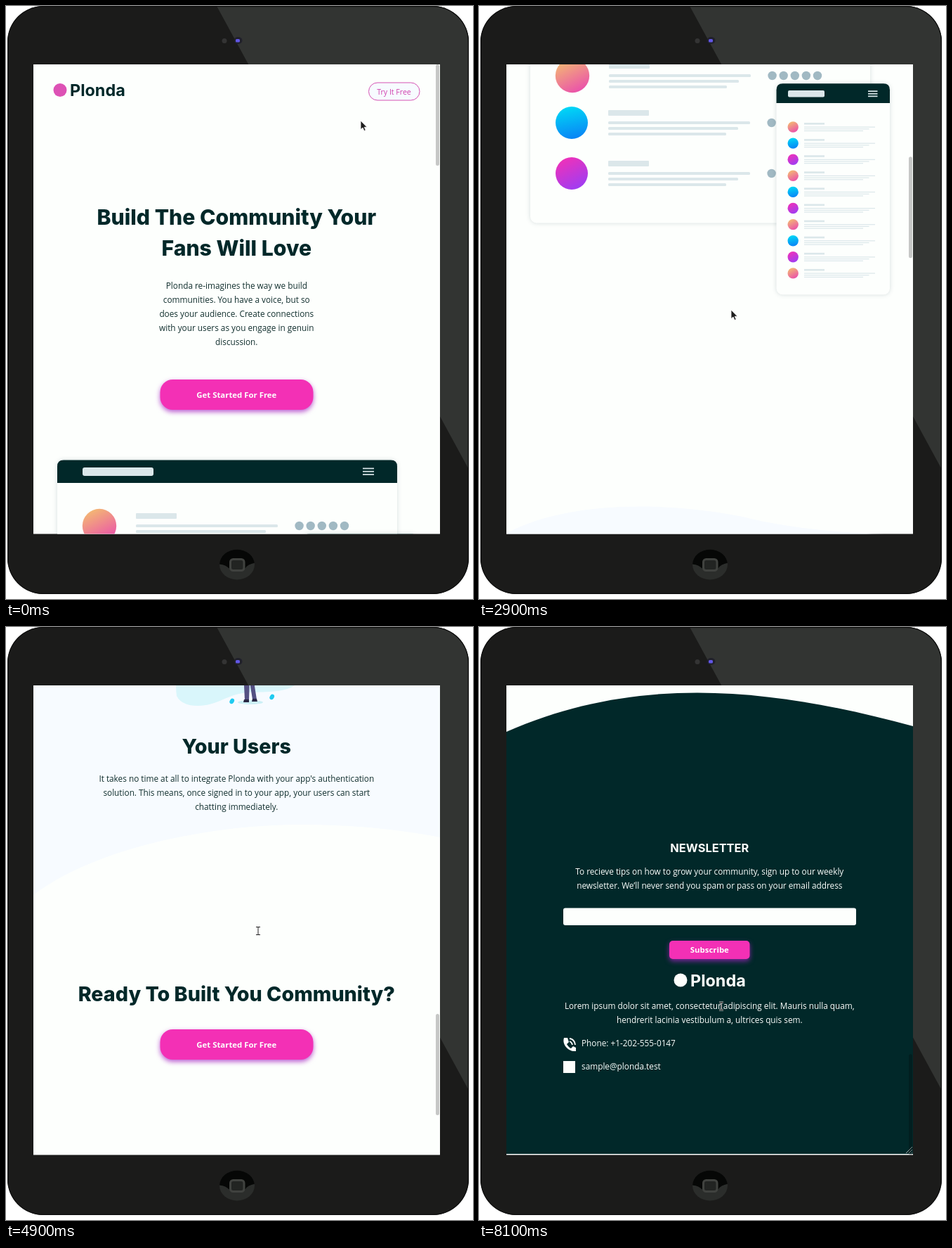
Animation of 665x843 px, one loop 8.9 s. Source, as an HTML page:

```html
<!DOCTYPE html>
<html lang="en">
<head>
<meta charset="utf-8">
<title>Tablet landing page</title>
<style>
  html, body { margin: 0; width: 100%; height: 100%; overflow: hidden; background: #fff; }
  svg { display: block; width: 665px; height: 843px; }
  text { font: 11.8px "Open Sans", sans-serif; fill: #12302f; }
  .mid { text-anchor: middle; }
  .h1, .h2, .h3, .brand { font-family: Inter, sans-serif; font-weight: 700; fill: #012829; }
  .h1 { font-size: 30.2px; font-weight: 800; }
  .h2 { font-size: 28.7px; font-weight: 800; }
  .h3 { font-size: 16.4px; }
  .brand { font-size: 23.4px; }
  .label { font-size: 11.4px; font-weight: 700; }
  .light text, .label { fill: #fdfffd; }
  .btn rect { filter: drop-shadow(0 3px 3.5px rgba(165, 35, 195, .75)); }
  .card { filter: drop-shadow(0 0 3px rgba(0, 40, 50, .16)); }
</style>
</head>
<body>
<svg viewBox="0 0 665 843">
  <defs>
    <clipPath id="screen"><rect x="39" y="83" width="579" height="667.4"/></clipPath>
    <clipPath id="body"><rect x="2" width="657" height="836" rx="51"/></clipPath>
    <clipPath id="home"><ellipse cx="329" cy="794" rx="25" ry="21.5"/></clipPath>
    <linearGradient id="sun" x1=".2" y1="0" x2=".7" y2="1"><stop stop-color="#f4bd70"/><stop offset="1" stop-color="#ea4fac"/></linearGradient>
    <linearGradient id="sea" x1=".4" y1="0" x2=".6" y2="1"><stop stop-color="#00d8f6"/><stop offset="1" stop-color="#0a83f5"/></linearGradient>
    <linearGradient id="plum" x1=".2" y1="0" x2=".7" y2="1"><stop stop-color="#f331b6"/><stop offset="1" stop-color="#9d3df4"/></linearGradient>
    <path id="leaf" d="M0 3Q-5 2 -5 -2Q-2 -2 -1 0Q-1 -3 0 -4Q2 -3 1 0Q3 -2 5 -2Q4 3 0 3Z" fill="#14c9f2"/>
  </defs>

  <!-- tablet -->
  <g clip-path="url(#body)">
    <rect width="665" height="843" fill="#1b1b1a"/>
    <path d="M300 0H665V670L657 655Z" fill="#323432"/>
    <rect x="2" width="657" height="836" rx="51" fill="none" stroke="#0d0d0d" stroke-width="2.5"/>
  </g>
  <circle cx="311" cy="49.5" r="3.5" fill="#343434"/>
  <ellipse cx="330.5" cy="49" rx="6" ry="5" fill="#20202b"/>
  <rect x="327" y="47" width="6" height="4.5" rx="1.5" fill="#6257e6"/>
  <g clip-path="url(#home)">
    <rect x="300" y="770" width="60" height="50" fill="#2b2d2b"/>
    <path d="M300 770H360V791Q345 792 341 799Q329 803 317 799Q313 794 300 793Z" fill="#060706"/>
    <rect x="319.500" y="786.500" width="19.500" height="16" rx="4" fill="#222422" stroke="#40423f" stroke-width="3"/>
  </g>

  <g clip-path="url(#screen)">
    <rect x="39" y="83" width="579" height="668" fill="#fdfffd"/>
    <g id="page">
      <g id="hero">
        <circle cx="77" cy="119.5" r="9.5" fill="#dd52b5"/>
        <text x="91" y="127.5" class="brand">Plonda</text>
        <g id="try">
          <rect x="516.5" y="109" width="72.5" height="25" rx="12.5" fill="#f7fbff" stroke="#d552b4"/>
          <text x="552.5" y="125.5" class="mid" style="font-size:10.6px;fill:#d03fae">Try It Free</text>
        </g>
      </g>
      <g id="mock"></g>

      <!-- first and second features -->
      <g id="talk" transform="translate(0 1283)">
        <path d="M39 107C120 62 260 60 375 83C450 102 540 108 618 109V545C550 567 490 577 410 576C330 572 290 560 225 560C160 562 100 572 39 588Z" fill="#f7fbff"/>
        <path d="M247 238C247 222 265 210 290 211C320 212 330 222 352 226C390 228 410 240 414 262C418 282 428 290 428 312C428 335 412 344 396 343C372 342 362 331 342 333C318 337 300 346 284 342C270 338 276 318 280 302C284 282 248 264 247 238Z" fill="#d9f6fb"/>
        <g id="posts"></g>
        <g fill="#d2f1f5"><ellipse cx="261" cy="373" rx="35" ry="5.5"/><ellipse cx="397" cy="371" rx="35" ry="5.5"/></g>
        <use href="#leaf" x="303" y="366"/><use href="#leaf" x="354" y="371"/><use href="#leaf" x="420" y="362"/>
        <!-- man -->
        <ellipse cx="249" cy="267" rx="6" ry="8.5" fill="#a0616a"/>
        <path d="M240 267Q238 256 248 256Q258 255 258 263L253 263L250 266L246 264Z" fill="#2f2e41"/>
        <path d="M245 276L259 275L266 321H244Z" fill="#e9f0f1"/>
        <path d="M245 275Q236 278 235 299L234 315L242 321L248 318L246 283ZM257 274Q270 277 272 297L274 313L267 321L262 316L260 287Z" fill="#504c62"/>
        <path d="M245 320L268 319L269 369H261L257 332L254 370H246Z" fill="#2f2e3c"/>
        <path d="M246 369H254V375H244ZM261 368H269L270 375H260Z" fill="#a0616a"/>
        <!-- woman -->
        <path d="M390 269Q390 259 401 260Q411 264 410 273Q419 280 414 290L399 286Z" fill="#403b4b"/>
        <ellipse cx="396" cy="271" rx="5.5" ry="8" fill="#a0616a"/>
        <path d="M389 283Q401 276 411 282Q416 294 412 305H388Z" fill="#5d5b69"/>
        <path d="M381 294L388 291L394 303L387 306Z" fill="#f3f4f8"/>
        <path d="M410 298L391 296L388 299L410 305Z" fill="#a0616a"/>
        <path d="M389 304H410Q413 325 410 343H387Q386 322 389 304Z" fill="#3b374a"/>
        <path d="M388 343H394L392 370L386 375ZM401 343H408L407 374H403Z" fill="#b06a72"/>

        <!-- table scene -->
        <path d="M211 632Q223 610 250 615C285 619 300 617 330 612Q395 612 410 628C413 650 400 665 398 690Q385 718 310 712Q230 724 213 690C205 672 209 650 211 632Z" fill="#dff5f7"/>
        <path d="M215 633H303M230 638H316M344 658H403M218 663H255M312 665H350" stroke="#fdfffd" stroke-width="3"/>
        <path d="M226 641h22l-3 5 4 5h-27l4-5z" fill="#fdfffd"/>
        <g fill="none" stroke="#d39d9e" stroke-linecap="round">
          <path d="M369 695Q366 670 362 641" stroke-width="11"/>
          <path d="M362 643Q347 627 323 619M363 642Q376 628 405 626" stroke-width="5"/>
          <path d="M351 628L347 608M341 624L327 612M363 636L365 608M378 631L379 609M391 627L408 617M366 616L377 607" stroke-width="2.5"/>
        </g>
        <g fill="#d2eff5"><ellipse cx="337" cy="650" rx="3" ry="5"/><ellipse cx="346" cy="663" rx="3" ry="6"/></g>
        <ellipse cx="278" cy="667" rx="9" ry="10" fill="#473448"/><path d="M276 676Q286 680 290 695H272Z" fill="#68517c"/>
        <ellipse cx="321" cy="665" rx="8" ry="10" fill="#4e394d"/><ellipse cx="319" cy="670" rx="5" ry="7" fill="#a75565"/>
        <path d="M303 697Q303 680 315 676L328 675Q337 679 338 696Z" fill="#4d4c79"/><path d="M316 676H325L321 691Z" fill="#e5658a"/>
        <circle cx="267" cy="657" r="10" fill="#f3d49c"/><ellipse cx="265" cy="661" rx="6" ry="7" fill="#edafa6"/>
        <path d="M251 673Q261 663 275 671L283 700L280 713H253Q247 690 251 673Z" fill="#e85b83"/>
        <path d="M262 711H282Q294 712 302 733L307 742L301 745L278 723L269 736L260 731Z" fill="#a9cdec"/>
        <ellipse cx="367" cy="667" rx="10" ry="9" fill="#a55867"/><ellipse cx="364" cy="673" rx="5" ry="6" fill="#edafa6"/>
        <path d="M354 685Q369 676 382 684L376 710H351Z" fill="#0fcdf7"/><path d="M376 685Q391 682 386 691L375 699Z" fill="#edafa6"/>
        <path d="M344 710H375L369 724H347L342 742H334L336 720Z" fill="#51507f"/><path d="M334 733H350V750H329Z" fill="#c96370"/>
        <path d="M276 689H309L331 690L355 689V695H281Z" fill="#eab5a9"/><path d="M306 692H328" stroke="#b85c70" stroke-width="5"/>
        <g fill="none" stroke-width="3"><path d="M302 695L310 750M324 695L306 747M309 695L315 750M342 695L357 731" stroke="#e9b9a5"/>
          <path d="M254 686Q259 690 261 718H291M261 718L258 750M291 718L294 750M381 690L374 721H344M374 721L372 750M344 721L337 750" stroke="#d19ba6"/></g>
        <path d="M229 739Q208 724 213 709Q221 700 231 711Q239 722 229 739Z" fill="#12cff4"/>
        <path d="M230 741Q220 731 222 725Q231 729 230 741ZM231 741Q232 727 242 724Q244 735 231 741Z" fill="#12cff4"/>
        <g fill="#26caed"><circle cx="221" cy="743" r="2"/><circle cx="248" cy="743" r="2"/></g>
        <path d="M386 732L391 729L387 725L393 728L397 723L396 730L401 733ZM208 738L212 731L215 738Z" fill="#9eb2b9"/>
      </g>

      <!-- third feature and call to action -->
      <g id="users" transform="translate(0 2278)">
        <path d="M39 -55C150 -90 270 -70 375 -63S540 -50 618 -57V299C555 287 485 280 410 281C280 283 125 316 39 381Z" fill="#f7fbff"/>
        <path d="M246 25C248 -22 290 -44 344 -40C403 -35 421 0 423 41Q425 73 411 83C395 94 365 92 345 93C315 95 302 112 273 112Q250 112 243 98C240 77 246 62 246 25Z" fill="#d9f6fb"/>
        <ellipse cx="348" cy="107" rx="18" ry="3" fill="#cceff5"/>
        <path d="M337 42H348L346 104H340ZM348 42H358L354 84L357 103H351L348 84Z" fill="#555183"/>
        <path d="M339 103H346V107H338ZM351 102H357L358 106H350Z" fill="#292744"/>
        <path d="M334 9Q347 0 360 9L358 50H337Z" fill="#12c9f1"/>
        <circle cx="347" cy="-4" r="8" fill="#a0616a"/><path d="M338 -5Q339 -15 348 -14Q358 -13 356 -5Z" fill="#2f2e41"/>
        <ellipse cx="322" cy="105.500" rx="3" ry="4" transform="rotate(30 322 105)" fill="#20cbf0"/>
        <ellipse cx="379" cy="99.500" rx="3" ry="4" transform="rotate(30 379 99)" fill="#20cbf0"/>
      </g>

      <!-- footer -->
      <g id="foot" class="light" transform="translate(0 3041)">
        <path d="M39 149C232 64 425 89 618 141V749H39Z" fill="#012829"/>
        <rect x="120" y="399.500" width="417" height="24.500" rx="3" fill="#fdfffd"/>
        <g class="btn"><rect id="sub" x="271" y="446" width="114.500" height="26" rx="5"/></g>
        <text x="328.300" y="463" class="label mid">Subscribe</text>
        <circle cx="287" cy="502" r="9.500" fill="#fdfffd"/>
        <text x="301" y="510.500" class="brand" style="fill:#fdfffd">Plonda</text>
        <path d="M121 584h5l2 6-3 3q3 5 6 6l3-3 4 2v5q-9 1-15-7-4-6-2-12z" fill="#fdfffd"/>
        <path d="M129 585Q136 586 137 594M129 589Q132 590 133 594" fill="none" stroke="#fdfffd" stroke-width="1.800"/>
        <rect x="120" y="617" width="17" height="17" fill="#fdfffd"/>
        <text x="146" y="596">Phone: +1-202-555-0147</text>
        <text x="146" y="629">sample@plonda.test</text>
        <path d="M608 748L617 739M612 748L617 743M615.500 748L617 746.500" stroke="#a5b0b0"/>
      </g>
    </g>
    <rect id="thumb" x="612" width="5" height="144" rx="2.500" opacity=".22"/>
    <g id="cursor" stroke-linejoin="round">
      <path id="arrow" d="M0 0V12.500L3 10L5 14.500L7.200 13.500L5.200 9.300H9Z" fill="#1d1d1d" stroke="#fff" stroke-width=".8"/>
      <path id="hand" d="M-1.500 1Q0 -1 1.500 1V4.500L6 5.500Q7.500 6 7 9L6 13H-1L-5 7.500Q-5 5.500 -3 6.500L-1.500 8Z" fill="#fff" stroke="#222"/>
      <g id="beam" fill="none"><path d="M-3 -5.500H3M0 -5.500V5.500M-3 5.500H3" stroke="#fff" stroke-width="2.200"/><path d="M-3 -5.500H3M0 -5.500V5.500M-3 5.500H3" stroke="#222"/></g>
    </g>
  </g>
</svg>
<script>
const $ = id => document.getElementById(id);
const add = (id, markup) => $(id).insertAdjacentHTML('beforeend', markup);
const MID = 328.3;

const lines = (y, gap, cls, ...rows) => rows.map((row, i) =>
  `<text x="${MID}" y="${y + i * gap}" class="mid ${cls}">${row}</text>`).join('');
const para = (y, ...rows) => lines(y, 19.8, '', ...rows);
const bar = (x, y, w, h, fill, r = 0) =>
  `<rect x="${x}" y="${y}" width="${w}" height="${h}" rx="${r}" fill="${fill}"/>`;
const button = (id, y) => `<g class="btn"><rect id="${id}" x="219.500" y="${y}" width="218" height="43" rx="18"/></g>
  <text x="${MID}" y="${y + 25.5}" class="label mid">Get Started For Free</text>`;

add('hero', lines(310.5, 44, 'h1', 'Build The Community Your', 'Fans Will Love') +
  para(402.3, 'Plonda re-imagines the way we build', 'communities. You have a voice, but so',
    'does your audience. Create connections', 'with your users as you engage in genuin', 'discussion.') +
  button('start', 531));

add('talk', lines(447, 0, 'h2', 'Grow Together') +
  para(487, 'Generate meaningful discussions with your audience and build a strong,',
    'loyal community. Think of the insightful conversations you miss out on', 'with a feedback form.') +
  lines(829, 0, 'h2', 'Flowing Conversations') +
  para(869, 'You would not go through a long page to have a good conversation,',
    'so why should your users? Keep every reply in one place and', 'let the talk flow.'));

add('users', lines(180, 0, 'h2', 'Your Users') +
  para(220, "It takes no time at all to integrate Plonda with your app's authentication",
    'solution. This means, once signed in to your app, your users can start', 'chatting immediately.') +
  lines(532, 0, 'h2', 'Ready To Built You Community?') + button('join', 572));

add('foot', lines(319.5, 0, 'h3', 'NEWSLETTER') +
  para(352, 'To recieve tips on how to grow your community, sign up to our weekly',
    'newsletter. We’ll never send you spam or pass on your email address') +
  para(543, 'Lorem ipsum dolor sit amet, consectetur adipiscing elit. Mauris nulla quam,',
    'hendrerit lacinia vestibulum a, ultrices quis sem.'));

// App mock-ups
const PALE = '#dbe7ea';
const paints = ['sun', 'sea', 'plum'];
const frame = (x, y, w, h, head) => `<g class="card">${bar(x, y, w, h, '#fdfffd', 9)}</g>
  <path d="M${x} ${y + head}v${9 - head}q0-9 9-9h${w - 18}q9 0 9 9v${head - 9}z" fill="#012829"/>`;
const menu = (x, y, w, gap) => [-1, 0, 1].map(i => bar(x, y + i * gap - .8, w, 1.7, PALE)).join('');

let mock = frame(73, 645.5, 484, 303, 32.5) + bar(109, 656, 101, 12, PALE, 3) + menu(508, 661.7, 16, 4.3);
[739, 806, 878].forEach((y, i) => {
  const shift = i ? -1 : 0;
  mock += `<circle cx="${133 + shift}" cy="${y}" r="${i ? 23 : 24.2}" fill="url(#${paints[i]})"/>` +
    bar(185 + shift, y - 18, 58, 8, PALE, 1);
  for (let k = 0; k < 3; k++) mock += bar(185 + shift, y - 2 + k * 8, 202 - k * 17, 4, PALE, 1.5);
  for (let k = 0; k < 5; k++) mock += `<circle cx="${417.6 + shift + k * 16.1}" cy="${y}" r="6.200" fill="#a1b9c3"/>`;
});
mock += frame(423.5, 750.3, 161.5, 300, 27.7) + bar(440, 760, 52, 9.5, PALE, 2) + menu(554, 764.7, 13.5, 3.6);
for (let i = 0; i < 10; i++) {
  const y = 812 + i * 23.1;
  mock += `<circle cx="447.200" cy="${y}" r="7.700" fill="url(#${paints[i % 3]})"/>` + bar(463, y - 6, 29, 2.6, PALE);
  for (let k = 0; k < 3; k++) mock += bar(463, y - .5 + k * 2.7, 101 - k * 8.5, 1.2, PALE);
}
add('mock', mock);

// Floating posts
const post = (x, y, w, h) => {
  const tone = '#c5eff5';
  let s = `<rect x="${x}" y="${y}" width="${w}" height="${h}" fill="#f2f8f6" stroke="#dfecec" stroke-width=".8"/>
    <circle cx="${x + w * .19}" cy="${y + h * .46}" r="${h * .19}" fill="${tone}"/>`;
  for (let k = 0; k < 4; k++) s += bar(x + w * .42, y + h * (.22 + k * .14), w * (k % 2 ? .34 : .45), h * .055, tone);
  return s + bar(x + w * .75, y + h * .8, w * .13, h * .11, h > 30 ? '#12cdf4' : tone);
};
add('posts', post(310, 225, 40, 22) + post(321, 262, 41, 20) + post(277, 285, 36, 21) +
  post(265, 239, 64, 35) + post(310, 287.5, 61, 34));

// Timeline
const LOOP = 8900, STEP = 100;
const scroll = [[700, 0], [1100, 104], [1200, 104], [1800, 209], [2100, 209], [2600, 450], [2700, 450],
  [2900, 640], [3000, 640], [3600, 1283], [3900, 1560], [4000, 1560], [4200, 1660], [4300, 1660],
  [4900, 2278], [5200, 2562], [5400, 2571], [6100, 2571], [6300, 2930], [6400, 3032], [6500, 3041]];
const pointer = [[0, 505, 163], [500, 552, 123], [1200, 552, 123], [1800, 364, 357], [2100, 364, 357],
  [2600, 359, 432], [5500, 359, 432], [6000, 360, 312], [6500, 360, 312], [7000, 341, 499],
  [7300, 345, 460], [7700, 345, 460], [8100, 345, 539]];
const shapes = [[0, 'arrow'], [400, 'hand'], [900, 'arrow'], [1800, 'hand'], [2300, 'arrow'], [4600, 'beam'],
  [5600, 'arrow'], [7300, 'hand'], [7900, 'beam']];

const clamp = v => Math.max(0, Math.min(1, v));
function at(keys, t, col = 1) {
  const i = keys.findIndex(k => k[0] > t);
  if (i < 0) return keys[keys.length - 1][col];
  if (!i) return keys[0][col];
  const a = keys[i - 1], b = keys[i];
  return a[col] + (b[col] - a[col]) * (t - a[0]) / (b[0] - a[0]);
}
const hover = (t, on, off) => clamp((t - on) / 200) - clamp((t - off) / 200);
const pink = h => `rgb(${243 + 4 * h},${48 + 79 * h},${181 + 36 * h})`;

function draw(now) {
  const t = Math.floor(now % LOOP / STEP) * STEP;
  const top = Math.round(at(scroll, t));
  $('page').setAttribute('transform', `translate(0 ${-top})`);
  $('thumb').setAttribute('y', 83 + Math.min(524, top * .205));
  $('cursor').setAttribute('transform', `translate(${at(pointer, t)} ${at(pointer, t, 2)})`);
  const shape = shapes.filter(k => k[0] <= t).pop()[1];
  for (const id of ['arrow', 'hand', 'beam']) $(id).style.display = id === shape ? '' : 'none';
  $('try').style.opacity = 1 - .45 * hover(t, 300, 800);
  $('start').style.fill = pink(hover(t, 1600, 2200));
  $('join').style.fill = pink(hover(t, 5900, 6200));
  $('sub').style.fill = pink(hover(t, 7300, 7700));
}
function tick() {
  draw(performance.now());
  requestAnimationFrame(tick);
}
tick();
</script>
</body>
</html>
```
